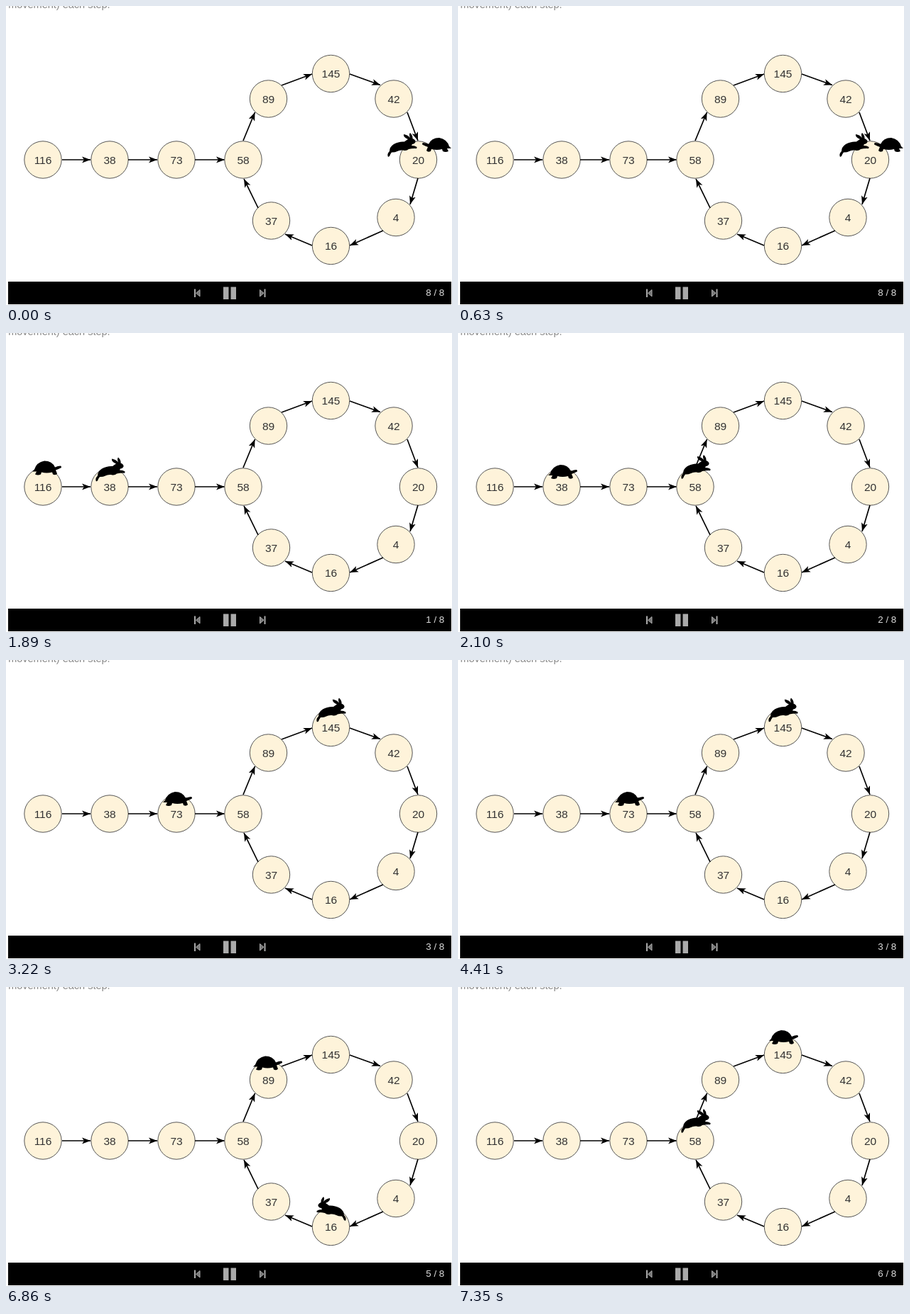
Recreate the animation shown at these times as an HTML page. Size 628 by 422 pixels, loop 8000 ms.

```html
<!DOCTYPE html>
<html lang="en">
<head>
<meta charset="utf-8">
<title>Cycle detection</title>
<style>
  html, body { margin: 0; width: 100%; height: 100%; overflow: hidden; background: #fff; }
  svg { display: block; width: 628px; height: 422px; font-family: "Liberation Sans", Arial, sans-serif; }
  .node circle { fill: #fef3da; stroke: #555; stroke-width: 1; }
  .node text { font-size: 15.5px; fill: #333; text-anchor: middle; }
  .link { stroke: #000; stroke-width: 1.7; }
</style>
</head>
<body>
<svg viewBox="0 0 628 422">
  <defs>
    <marker id="head" markerUnits="userSpaceOnUse" markerWidth="13" markerHeight="10" refX="12" refY="5" orient="auto">
      <path d="M0 .5 L12 5 L0 9.5 L3 5 Z"/>
    </marker>
  </defs>
  <text x="-1.7" y="2.6" font-size="14.5" fill="#888">-movement) each step.</text>
  <g id="graph"></g>
  <path id="tortoise" d="M0 15 L3 12 Q6 2 17 0 Q28 0 32 9 Q36 7 40 7 Q42 9 40 10 Q36 12 33 13 L35 18 Q33 21 29 19 L28 16 Q20 18 13 16 L12 19 Q8 21 4 19 L6 15 Z"/>
  <path id="hare" d="M1 34 Q-1 30 3 26 Q3 20 9 16 Q16 12 24 12.5 Q27 10 29 9 Q22 6 23 2 Q29 3 32 7 Q30 2 32 0 Q36 4 35.5 8 Q40 10 39.5 13 Q38 16 35 16 L34 18 Q39 18 41.5 20 Q42 23 39 22 Q34 22 30 23 Q27 26 22 24.5 Q17 24 14 26 Q10 28 6 27.5 Q4 30 3 33 Z"/>
  <rect x="3" y="389" width="624" height="32"/>
  <g fill="#aaa">
    <path d="M306 396.5h7.5v17.5h-7.5z M316.5 396.5h7.5v17.5h-7.5z"/>
    <path d="M265 399.5h2v11.5h-2z M363.5 399.5h2v11.5h-2z"/>
    <path d="M273 400.5v9.5l-5.5-4.75z M357.500 400.5v9.5l5.5-4.75z" fill="#777" stroke="#aaa"/>
  </g>
  <text id="counter" x="617.3" y="409.3" font-size="13.4" fill="#ddd" text-anchor="end"></text>
</svg>
<script>
const LOOP = 8000, FIRST_STEP = 700, STEP = 1260;

// label, center, then the outgoing arrow's start and tip
const nodes = [
  [116, 52, 217, 79, 217, 119, 217],
  [38, 146, 217, 172, 217, 213, 217],
  [73, 240, 217, 266, 217, 308, 217],
  [58, 334, 217, 334, 190, 350.5, 150],
  [89, 369.5, 131, 388, 112, 431, 96],
  [145, 457.5, 95.5, 484, 96, 527, 111.5],
  [42, 546, 131, 565, 150, 580, 190],
  [20, 580.5, 217, 580, 243, 569, 280],
  [4, 549, 298.5, 531, 317, 484, 338],
  [16, 457.5, 338.5, 431, 338, 393, 322],
  [37, 373.5, 303, 355, 285, 335, 244],
];

// top-left corner of each animal, and whether it faces left
const steps = [
  { page: 1, tortoise: [37, 180.5], hare: [126, 175.5] },
  { page: 2, tortoise: [127, 186], hare: [314, 172] },
  { page: 3, tortoise: [221, 186], hare: [437, 53.5] },
  { page: 4, tortoise: [316, 186], hare: [563, 171, true] },
  { page: 5, tortoise: [348, 97.5], hare: [437, 296, true] },
  { page: 6, tortoise: [438, 61], hare: [314, 172] },
];
const finish = { page: 8, tortoise: [585, 186, true], hare: [537, 179] };

const byId = id => document.getElementById(id);

byId('graph').innerHTML = nodes.map(([label, x, y, x1, y1, x2, y2]) => `
  <g class="node"><circle cx="${x}" cy="${y}" r="26.2"/><text x="${x}" y="${y + 5.5}">${label}</text></g>
  <line class="link" x1="${x1}" y1="${y1}" x2="${x2}" y2="${y2}" marker-end="url(#head)"/>`).join('');

function place(id, [x, y, facesLeft]) {
  const transform = facesLeft ? `translate(${x + 42} ${y}) scale(-1 1)` : `translate(${x} ${y})`;
  byId(id).setAttribute('transform', transform);
}

function draw(now) {
  const t = now % LOOP;
  const step = t < FIRST_STEP ? finish : steps[Math.min(5, Math.floor((t - FIRST_STEP) / STEP))];
  place('tortoise', step.tortoise);
  place('hare', step.hare);
  byId('counter').textContent = `${step.page} / 8`;
}

const start = performance.now();
function tick() {
  draw(performance.now() - start);
  requestAnimationFrame(tick);
}
tick();
</script>
</body>
</html>
```
